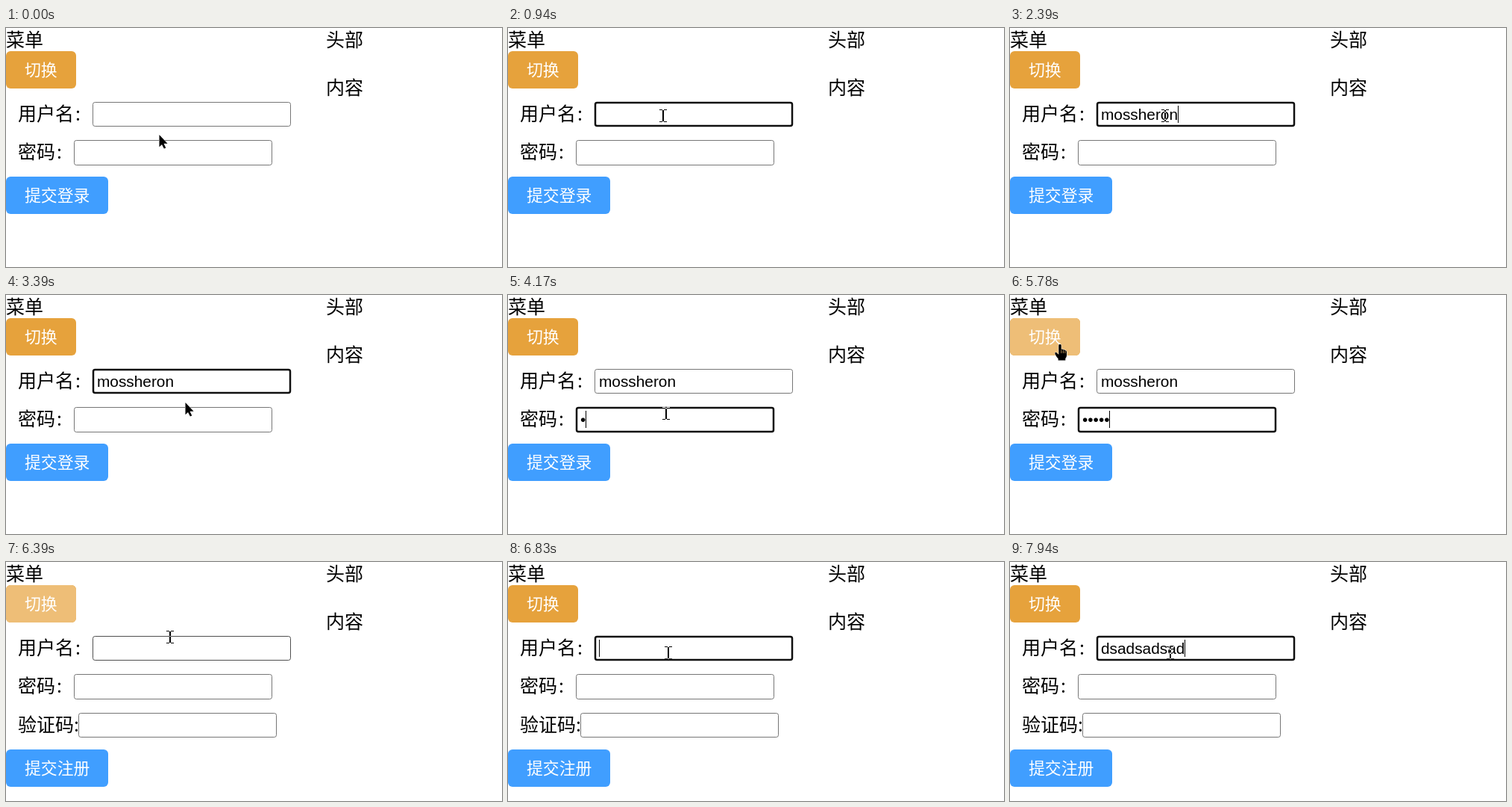
These frames come from a looping animation (665x320 px, 8 s). An HTML page:

```html
<!DOCTYPE html>
<html lang="zh-CN">
<head>
<meta charset="utf-8">
<title>登录表单</title>
<style>
  html, body { margin: 0; width: 100%; height: 100%; overflow: hidden; background: #fff; }
  svg { display: block; width: 100%; height: 100%; }
  text { font: 25px "Noto Sans CJK SC", "Noto Sans CJK", sans-serif; white-space: pre; }
  .btn { font-size: 21.875px; font-weight: 500; fill: #fff; }
  .value { font: 20.83px "Liberation Sans", Arial, sans-serif; }
  .box { fill: #fff; stroke: #767676; }
  .hover { stroke: #4f4f4f; }
  .ring { fill: none; stroke: #101010; stroke-width: 2.5; }
  .ibeam { mix-blend-mode: difference; fill: #fff; }
  .solid { stroke: #fff; stroke-width: 1; paint-order: stroke; stroke-linejoin: round; }
</style>
</head>
<body>
<svg viewBox="0 0 665 320">
  <rect width="665" height="320" fill="#fff"/>
  <text x="0" y="25">菜单</text>
  <text x="429" y="25">头部</text>
  <text x="429" y="89">内容</text>

  <rect width="94" height="50" y="31" rx="6" fill="#e6a23c"/>
  <rect id="tint" width="94" height="50" y="31" rx="6" fill="#eebe77"/>
  <text class="btn" x="25" y="63.5">切换</text>

  <g id="fields"></g>

  <g id="submit">
    <rect y="199" width="137" height="50" rx="6" fill="#409eff"/>
    <text id="submitText" class="btn" x="25" y="231.5"></text>
  </g>

  <rect id="caret" width="1" height="23"/>

  <path id="arrow" class="solid" d="M.5 0V16.2L4 12.9 6.9 18.6 9.3 17.5 6.5 11.8H11.6Z"/>
  <g id="hand">
    <path class="solid" d="M-1.7 1.4Q-1.7 0 0 0T1.7 1.4V6.8Q3.6 6 4.4 7.4 6.2 6.8 6.9 8.2 9 8 9 10.2V15Q9 17.4 7.3 19V21.4H-2.4V19.2Q-4.6 17-6.4 13.4-7.3 11.2-5.8 10.8-4.6 10.6-3.2 12.4L-1.7 13.8Z"/>
    <path d="M1.8 7.6V12M4.4 8.2V12M6.9 9V12" stroke="#eebe77" stroke-width=".7"/>
  </g>
  <path id="beam" class="ibeam" d="M-5-8H-1V-7H1V-8H5V-7H1V8H5V9H1V8H-1V9H-5V8H-1V-7H-5Z"/>
</svg>
<script>
const LOOP = 8000, FPS = 18, BLINK = 510, SWITCH = 6060;
const $ = id => document.getElementById(id);

// pointer moves after resting at START: from, to, x, y
const START = [205, 143];
const MOVES = [
  [0, 220, 208, 117],
  [2780, 3170, 256, 137],
  [3330, 3500, 212, 158],
  [4440, 4940, 153, 189],
  [4940, 5390, 67, 66],
  [6060, 6390, 220, 100],
  [6390, 6610, 215, 121]
];

// each stay in a field: when it has focus, when and what is typed
const VISITS = [
  { field: 0, from: 390, to: 3670, type: [1440, 2390], text: 'mossheron' },
  { field: 1, from: 3670, to: SWITCH, type: [4170, 4750], text: '•••••' },
  { field: 0, from: 6780, to: LOOP, type: [7390, 7940], text: 'dsadsadsad' }
];

const ramp = (t, a, b) => Math.min(1, Math.max(0, (t - a) / (b - a)));
const show = (el, on) => el.setAttribute('visibility', on ? 'visible' : 'hidden');

function add(parent, tag, attrs) {
  const el = document.createElementNS('http://www.w3.org/2000/svg', tag);
  for (const k in attrs) el.setAttribute(k, attrs[k]);
  return parent.appendChild(el);
}

function makeField(label, gap, x, y, h) {
  const g = add($('fields'), 'g', {});
  const name = add(g, 'text', { x: 16, y: y + 25 });
  name.textContent = label;
  add(name, 'tspan', { dx: gap }).textContent = ':';
  return {
    x, y, h, g,
    box: add(g, 'rect', { class: 'box', x: x + .5, y: y + .5, width: 265, height: h - 1, rx: 2.8 }),
    ring: add(g, 'rect', { class: 'ring', x: x + 1, y: y + 1, width: 264, height: h - 2, rx: 2.5 }),
    text: add(g, 'text', { class: 'value', x: x + 6, y: y + 24 })
  };
}

const fields = [
  makeField('用户名', 2, 116, 99, 33),
  makeField('密码', 2, 91, 150, 34),
  makeField('验证码', 0, 97, 202, 33)
];

function pointerAt(t) {
  let [x, y] = START;
  for (const [a, b, toX, toY] of MOVES) {
    const p = ramp(t, a, b);
    x += (toX - x) * p;
    y += (toY - y) * p;
  }
  return [Math.round(x), Math.round(y)];
}

function typed({ type: [a, b], text }, t) {
  return t < a ? '' : text.slice(0, 1 + Math.floor(ramp(t, a, b) * (text.length - 1)));
}

function caretOn({ from, type: [a, b] }, t) {
  if (t >= a && t < b) return true;
  return Math.floor((t - (t < a ? from : b)) / BLINK) % 2 === 0;
}

function draw(time) {
  const t = Math.round(Math.floor((time + 5) * FPS / 1000) * 100 / FPS) * 10;
  const signUp = t >= SWITCH;
  const [px, py] = pointerAt(t);
  const visit = VISITS.find(v => t >= v.from && t < v.to);

  let overField = false;
  fields.forEach((f, i) => {
    const live = i < 2 || signUp;
    const hover = live && px >= f.x && px < f.x + 266 && py >= f.y && py < f.y + f.h;
    const entry = VISITS.find(v => v.field === i && v.from >= SWITCH === signUp);
    overField = overField || hover;
    show(f.g, live);
    f.box.classList.toggle('hover', hover);
    f.ring.style.display = visit && visit.field === i ? '' : 'none';
    f.text.textContent = entry ? typed(entry, t) : '';
  });

  const on = visit && caretOn(visit, t);
  show($('caret'), on);
  if (on) {
    const f = fields[visit.field];
    const w = f.text.textContent ? f.text.getComputedTextLength() : 0;
    $('caret').setAttribute('x', Math.floor(f.x + 6 + w));
    $('caret').setAttribute('y', f.y + 5);
  }

  $('tint').setAttribute('opacity', ramp(t, 5230, 5330) - ramp(t, 6730, 6830));
  $('submit').setAttribute('transform', `translate(0 ${signUp ? 52 : 0})`);
  $('submitText').textContent = signUp ? '提交注册' : '提交登录';

  const overButton = px < 94 && py >= 31 && py < 81;
  const kind = overField ? 'beam' : overButton ? 'hand' : 'arrow';
  for (const id of ['beam', 'hand', 'arrow']) {
    show($(id), id === kind);
    $(id).setAttribute('transform', `translate(${px} ${py})`);
  }
}

const start = performance.now();
function tick() {
  draw((performance.now() - start) % LOOP);
  requestAnimationFrame(tick);
}
tick();
</script>
</body>
</html>
```
